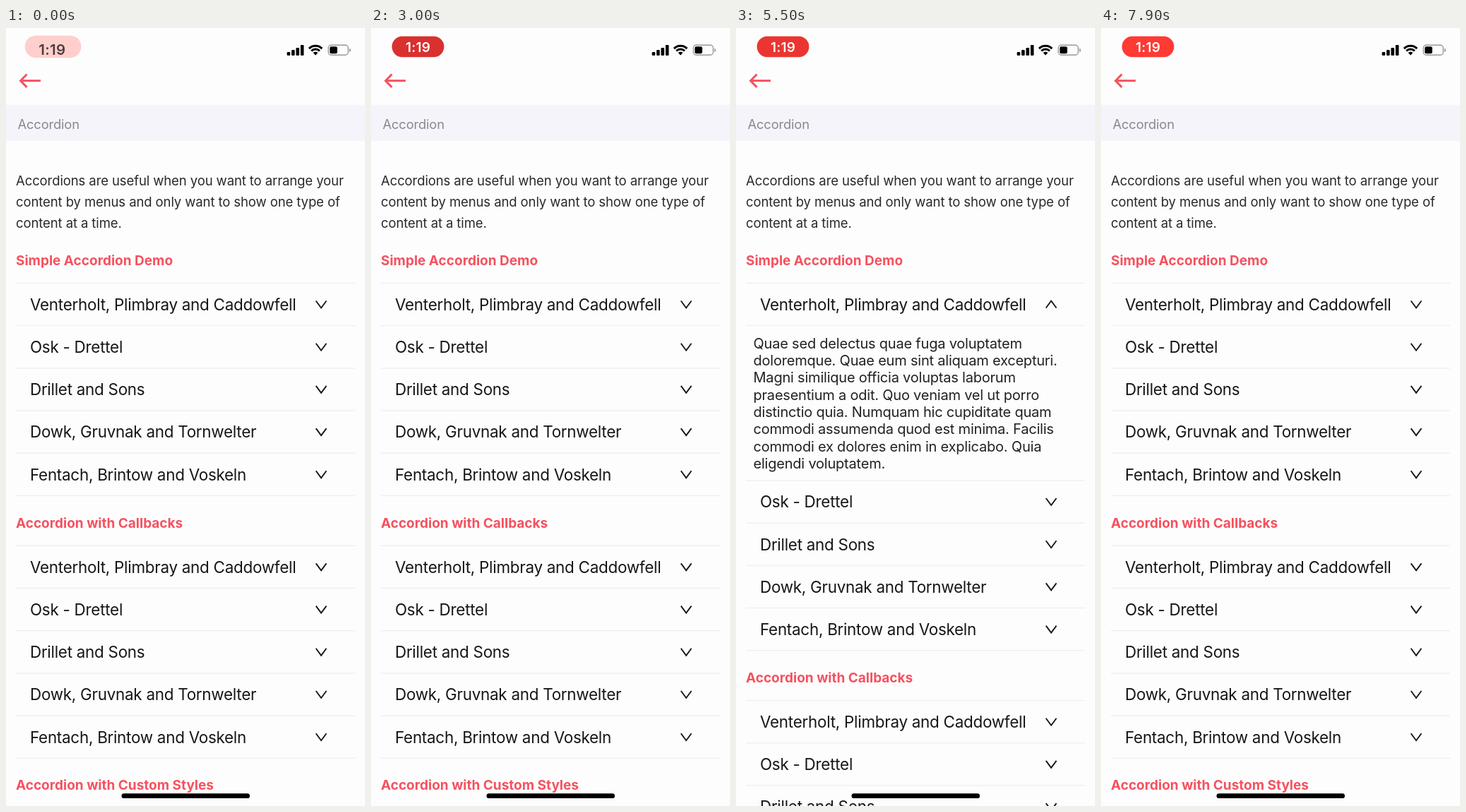
Write an HTML page with a canvas that moves like this. It is 508 px wide and 1102 px high and loops after 8 s.

```html
<!DOCTYPE html>
<html lang="en">
<head>
<meta charset="utf-8">
<title>Accordion</title>
<style>
html, body { margin: 0; width: 100%; height: 100%; overflow: hidden; background: #fefdfe; }
canvas { display: block; }
</style>
</head>
<body>
<canvas id="stage" width="508" height="1102"></canvas>
<script>
const ctx = document.getElementById('stage').getContext('2d');
const LOOP = 8000, STEP = 100;
const ACCENT = '#f4525f', INK = '#161618';
const ROW = 60.2, GROUP = 371.9, FIRST_LINE = 361.4, CONTENT_HEIGHT = 219.3;

const intro = [
  'Accordions are useful when you want to arrange your',
  'content by menus and only want to show one type of',
  'content at a time.'
];
const headings = ['Simple Accordion Demo', 'Accordion with Callbacks', 'Accordion with Custom Styles'];
const items = [
  'Venterholt, Plimbray and Caddowfell',
  'Osk - Drettel',
  'Drillet and Sons',
  'Dowk, Gruvnak and Tornwelter',
  'Fentach, Brintow and Voskeln'
];
const details = [
  'Quae sed delectus quae fuga voluptatem',
  'doloremque. Quae eum sint aliquam excepturi.',
  'Magni similique officia voluptas laborum',
  'praesentium a odit. Quo veniam vel ut porro',
  'distinctio quia. Numquam hic cupiditate quam',
  'commodi assumenda quod est minima. Facilis',
  'commodi ex dolores enim in explicabo. Quia',
  'eligendi voluptatem.'
];

const clamp = v => Math.max(0, Math.min(1, v));
const easeOut = v => 1 - (1 - v) ** 3;
const mix = (a, b, k) => a + (b - a) * k;
const progress = (t, start, length) => easeOut(clamp((t - start) / length));

function text(str, x, y, size, color, spacing = 0, weight = 400, align = 'left') {
  ctx.font = `${weight} ${size}px Inter, sans-serif`;
  ctx.letterSpacing = spacing + 'px';
  ctx.textAlign = align;
  ctx.fillStyle = color;
  ctx.fillText(str, x, y);
}

function box(x, y, w, h, r, color) {
  ctx.fillStyle = color;
  ctx.beginPath();
  ctx.roundRect(x, y, w, h, r);
  ctx.fill();
}

function polyline(points, width, color) {
  ctx.strokeStyle = color;
  ctx.lineWidth = width;
  ctx.beginPath();
  points.forEach(([x, y]) => ctx.lineTo(x, y));
  ctx.stroke();
}

function separator(y) {
  ctx.fillStyle = '#efeef1';
  ctx.fillRect(14, y - 0.7, 480, 1.4);
}

function chevron(y, up) {
  const d = up ? -5 : 5;
  polyline([[438.6, y - d], [446, y + d], [453.4, y - d]], 1.9, INK);
}

function drawStatus(t) {
  const show = mix(0.24, 1, progress(t, 0, 400));
  const pulse = (1 + Math.cos(Math.PI * t / 1000)) / 2;
  const color = `rgb(${mix(217, 255, pulse)}, ${mix(49, 58, pulse)}, ${mix(47, 51, pulse)})`;
  const grow = 3 * (1 - show) / 0.76;

  ctx.globalAlpha = show;
  box(29.6 - grow, 11.7 - grow / 3, 73.8 + 2 * grow, 29.5 + grow * 2 / 3, 14.7 + grow / 3, color);
  ctx.globalAlpha = 1 - show;
  text('1:19', 65.3, 38.4, 20.5, '#111', 0.3, 600, 'center');
  ctx.globalAlpha = clamp((show - 0.24) / 0.76);
  text('1:19', 66.5, 33.5, 19, '#fff', 0.2, 600, 'center');
  ctx.globalAlpha = 1;

  [5, 8, 11, 15].forEach((h, i) => box(397.6 + i * 6.4, 39 - h, 4.6, h, 1.2, '#000'));

  // Wi-Fi: two arcs above a small wedge
  ctx.strokeStyle = '#000';
  ctx.lineWidth = 2.9;
  for (const r of [13, 8.3]) {
    ctx.beginPath();
    ctx.arc(438, 38.3, r, -Math.PI * 0.75, -Math.PI * 0.25);
    ctx.stroke();
  }
  ctx.fillStyle = '#000';
  ctx.beginPath();
  ctx.moveTo(438, 38.8);
  ctx.arc(438, 38.3, 4.6, -Math.PI * 0.75, -Math.PI * 0.25);
  ctx.fill();

  ctx.strokeStyle = '#98989a';
  ctx.lineWidth = 1.4;
  ctx.beginPath();
  ctx.roundRect(456.2, 24.2, 28, 14, 4);
  ctx.stroke();
  box(458.2, 26.2, 10.5, 10, 2, '#000');
  box(485.8, 29, 2, 5, [0, 2, 2, 0], '#98989a');
}

function drawHeader() {
  polyline([[49, 74.7], [21, 74.7]], 3, ACCENT);
  polyline([[29.5, 65.5], [20.6, 74.7], [29.5, 83.9]], 3, ACCENT);
  ctx.fillStyle = '#f5f4fa';
  ctx.fillRect(0, 108.7, 508, 51.3);
  text('Accordion', 16.5, 142.8, 18.4, '#8a898e', -0.17);
  intro.forEach((line, i) => text(line, 14, 222.6 + i * 30, 18.5, '#29292c', -0.1));
}

function drawDetails(height) {
  if (height <= 0) return;
  const top = FIRST_LINE + ROW;
  ctx.save();
  ctx.beginPath();
  ctx.rect(0, top + 0.7, 508, height);
  ctx.clip();
  details.forEach((line, i) => text(line, 24.5, top + 32.2 + i * 24.33, 20, '#222225', -0.21));
  ctx.restore();
}

function drawGroup(index, opened, flipped) {
  let y = FIRST_LINE + index * GROUP + (index ? opened : 0);
  text(headings[index], 14, y - 25.8, 19, ACCENT, 0, 700);
  if (index === 2) return;
  separator(y);
  items.forEach((name, i) => {
    const first = index === 0 && i === 0;
    text(name, 34, y + 38.4, 22.4, INK, -0.25);
    chevron(y + 30.1, first && flipped);
    y += ROW;
    separator(y);
    if (first && opened > 0) {
      y += opened;
      separator(y);
    }
  });
}

function draw(now) {
  const t = Math.floor(now % LOOP / STEP) * STEP;
  const opened = CONTENT_HEIGHT * (progress(t, 3800, 350) - progress(t, 5800, 350));
  const flipped = t >= 4700 && t < 6600;

  ctx.fillStyle = '#fefdfe';
  ctx.fillRect(0, 0, 508, 1102);
  drawStatus(t);
  drawHeader();
  drawDetails(opened);
  headings.forEach((_, i) => drawGroup(i, opened, flipped));
  box(163.5, 1084.3, 181.5, 6.8, 3.4, '#000');
}

function tick() {
  draw(performance.now());
  requestAnimationFrame(tick);
}
tick();
</script>
</body>
</html>
```
